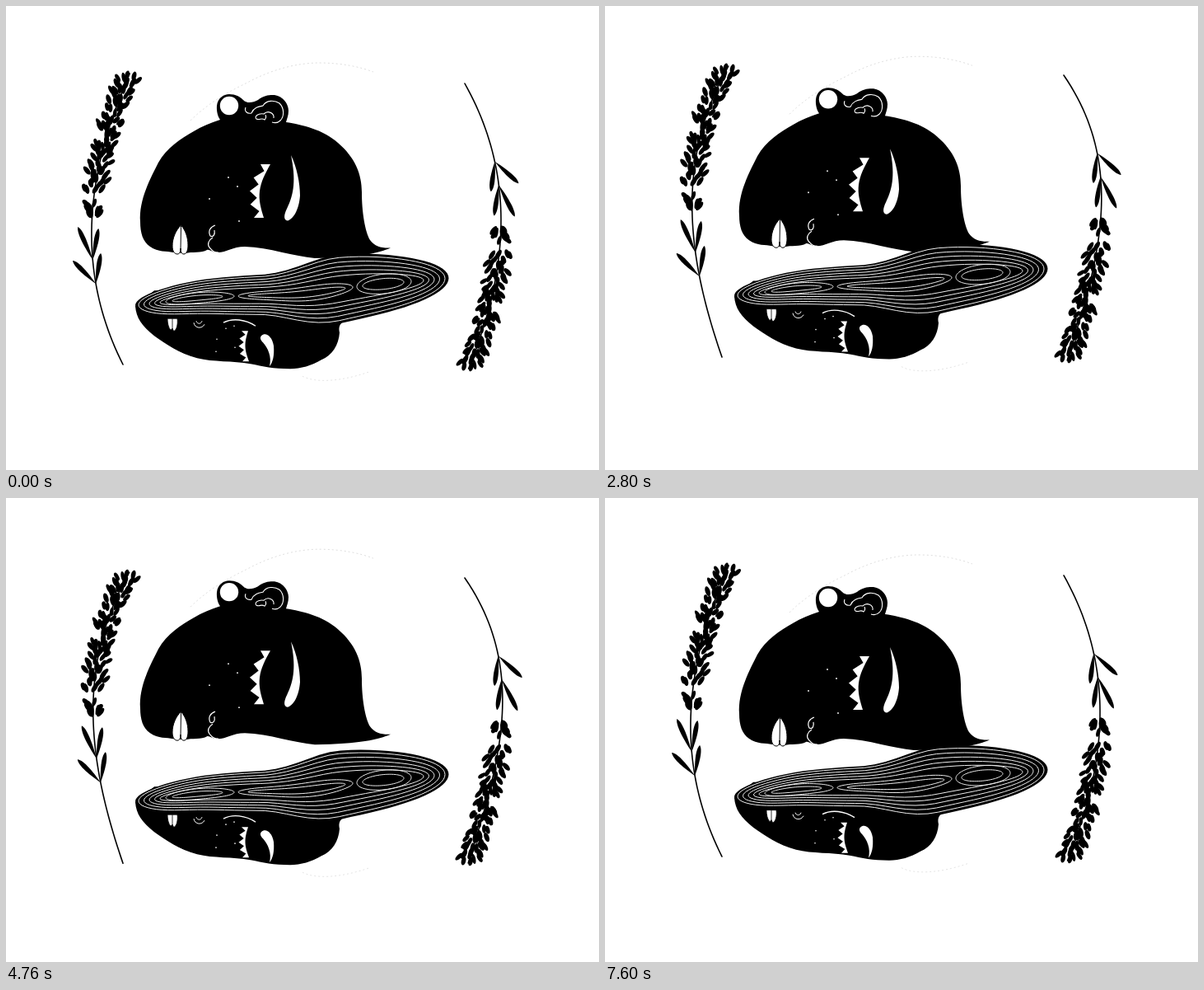
These frames come from a looping animation (720x563 px, 7640 ms). An HTML page with a canvas:

```html
<!DOCTYPE html>
<html lang="en">
<head>
<meta charset="utf-8">
<title>Lavender and wood</title>
<style>
html, body { margin: 0; width: 100%; height: 100%; overflow: hidden; background: #fff; }
canvas { display: block; }
</style>
</head>
<body>
<canvas id="stage" width="720" height="563"></canvas>
<script>
const ctx = document.getElementById('stage').getContext('2d');
const LOOP = 7640, STEP = 40, TAU = Math.PI * 2;
const INK = '#000', PAPER = '#fff';

const fill = (d, color) => { ctx.fillStyle = color; ctx.fill(d); };
const line = (d, color, width) => {
  ctx.strokeStyle = color;
  ctx.lineWidth = width;
  ctx.stroke(d);
};
const mix = (a, b, k) => a + (b - a) * k;
const bump = (u, at, wide) => Math.exp(-(((u - at) / wide) ** 2));
const smooth = (a, b, u) => {
  const k = Math.min(1, Math.max(0, (u - a) / (b - a)));
  return k * k * (3 - 2 * k);
};

let seed = 11;
const rnd = () => (seed = (seed * 16807) % 2147483647) / 2147483647;

// Path sampled from a function of 0..1
function trace(fn, n) {
  const p = new Path2D();
  for (let i = 0; i <= n; i++) p.lineTo(...fn(i / n));
  return p;
}

function disc(x, y, r, color) {
  ctx.beginPath();
  ctx.arc(x, y, r, 0, TAU);
  ctx.fillStyle = color;
  ctx.fill();
}

// Bowed strip whose left side is a row of teeth
function lashStrip(x0, x1, y, h, bow, reach) {
  const edge = t => mix(x0, x1, t) - bow * Math.sin(Math.PI * t);
  const p = trace(t => [edge(t), y + h * t], 16);
  for (let i = 8; i >= 0; i--)
    p.lineTo(edge(i / 8) - reach * (i % 2 ? 0.25 : 1), y + h * i / 8);
  return p;
}

function group(y, paint) {
  ctx.save();
  ctx.translate(0, y);
  paint();
  ctx.restore();
}

function dotted(d, color) {
  ctx.setLineDash([2, 3]);
  line(d, color, 0.7);
  ctx.setLineDash([]);
}

// ---- upper head ----
const head = new Path2D(`M163 262 C161 235 176 208 185 190 C195 172 212 161 228 152
  C238 146 248 142 260 138 C257 134 255.5 127 256 121 C257 112 264 107 271 107
  C279 107 284 110 288 114 C293 119 300 117 306 114 C312 109 318 108 324 108
  C335 108 343 118 343 127 C343 133 341 137 340 141 C360 144 385 150 403 166
  C424 184 432 204 432 226 C432 250 436 274 442 284 C448 292 456 294 467 293.5
  C452 300 430 305 375 306 C350 304 320 293 290 292 C275 292 268 299 257 299
  C250 299 247 295 244 296 C238 300 225 298 218 300 L203 299
  C195 297 185 299 175 292 C166 286 163 275 163 262Z`);
const teeth = new Path2D(`M212.5 266 C206 272 202 282 202 291 C202 298 205 301 208 301
  C211 301 212 298 212 294 C212 298 213 301 216 301 C219 301 221 297 221 290
  C221 281 218 272 212.5 266Z M212.5 267 L212 296`);
const lips = new Path2D(`M254 266 C248 268 245 273 248 279 C252 281 254 277 253 272
  M251 281 C246 284 244 289 247 293 C250 296 251 299 258 299`);
const lashes = lashStrip(321, 313, 192, 65, 9, 12);
const tear = new Path2D(`M346 181 C353 195 357 215 357 230 C356 245 350 258 342 260.5
  C336 260 338 252 341 246 C350 228 352 210 346 181Z`);
const ear = new Path2D(`M291 123 C289 128 293 131 298 130 C301 123 307 122 312 121
  C316 114 326 114 332 118 C338 124 338 134 333 139 C330 142 326 142 323 141
  M325 136 C326 130 318 126 313 131 C306 130 301 134 304 137 C308 139 310 135 314 138
  C316 136 316 134 315 132`);
const halo = new Path2D('M224 139 C245 118 270 104 293 93 C322 77 354 69 380 69 C408 69 430 74 446 80');
const freckles = [[270, 208], [281, 219], [247, 234], [283, 261]];

function drawHead() {
  dotted(halo, '#d0d0d0');
  fill(head, INK);
  disc(271, 121, 11.2, PAPER);
  line(ear, PAPER, 1.1);
  fill(lashes, PAPER);
  fill(tear, PAPER);
  for (const [x, y] of freckles) disc(x, y, 0.9, PAPER);
  fill(teeth, PAPER);
  line(teeth, INK, 1);
  line(lips, PAPER, 1.2);
}

// ---- lower face with the wood slab ----
const along01 = x => (x - 157) / 381;
const spine = u => 363 - 33 * u + 4 * bump(u, 0.53, 0.13) - 2.5 * bump(u, 0.2, 0.12);
const girth = u => 24 + 4 * bump(u, 0, 0.15) + 17 * smooth(0.4, 0.65, u);

// Closed loop of grain between two x, following the slab
function grain(x0, x1, thick) {
  return trace(t => {
    const a = t * TAU, x = mix(x0, x1, (1 + Math.cos(a)) / 2), u = along01(x);
    return [x, spine(u) + thick * girth(u) * Math.sin(a)];
  }, 90);
}

const slab = grain(157, 537.5, 1.07);
const rings = [];
for (let k = 0; k < 5; k++) rings.push(grain(161 + 6.5 * k, 533 - 6.5 * k, 0.98 - 0.14 * k));
for (let k = 0; k < 2; k++) {
  rings.push(grain(194 + 8 * k, 277 - 14 * k, 0.26 - 0.14 * k));
  rings.push(grain(282 + 12 * k, 421 - 9 * k, 0.25 - 0.13 * k));
  rings.push(grain(426 + 7 * k, 492 - 9 * k, 0.29 - 0.13 * k));
}
const face = new Path2D(`M157 364 C158 378 165 388 180 400 C194 410 210 421 232 427
  C252 432 275 430 297 434 C312 437 325 440 345 440 C358 440 371 436 383 429
  C396 424 404 411 405 396 C404 391 404 387 409 383 L400 345 L180 345Z`);
const lowTooth = new Path2D(`M196 379 L208 379 C209 386 207 394 203.5 394 L202 391
  L200 393 C197 390 196 384 196 379Z M202 379 L202 392`);
const nose = new Path2D('M228 384 C229 391 238 392 241 386 M231 382 C232 386 237 386 238 382');
const brow = new Path2D('M264 384 C275 378 291 380 303 388');
const lowLashes = lashStrip(294, 295, 394, 37, 4, 8);
const lowTear = new Path2D(`M310 400 C315 395 323 400 325 412 C326 424 324 432 320 437
  C323 425 318 415 312 408 C309 405 308 402 310 400Z`);
const lowHalo = new Path2D('M360 449 C375 457 405 456 440 444');
const lowFreckles = [[267, 391], [277, 388], [256, 404], [278, 414], [255, 419]];

function drawFace() {
  dotted(lowHalo, '#d8d8d8');
  fill(face, INK);
  fill(slab, INK);
  for (const r of rings) line(r, '#eee', 1);
  fill(lowTooth, PAPER);
  line(lowTooth, INK, 0.8);
  line(nose, PAPER, 1);
  line(brow, PAPER, 1.4);
  fill(lowLashes, PAPER);
  fill(lowTear, PAPER);
  for (const [x, y] of lowFreckles) disc(x, y, 0.8, PAPER);
}

// ---- lavender ----
const ROOT = 435, TALL = 357;
function stemX(y) {
  const v = (ROOT - y) / TALL;
  return 142 + v * (-180 + 230 * v - 40 * v * v);
}

// Sideways sway: the flower leans one way, the leaves the other
function bend(y, amount) {
  const u = 1 - (ROOT - y) / TALL;
  return amount * 130 * u * (1 - u) * (u - 0.45);
}

const leaves = [[337, -28, -28], [337, 6, -37], [308, -18, -40], [308, 7, -38]];
const buds = [];
for (let w = 0; w < 10; w++) {
  const y = w ? 231 - w * 15.8 : 247, reach = w ? 12.5 : 9;
  for (let i = 0; i < 11; i++) {
    const s = i / 5 - 1, by = y + (rnd() - 0.5) * 16;
    buds.push({
      x: stemX(by) + s * reach + (rnd() - 0.5) * 4,
      y: by,
      tilt: (w ? 0.2 : 0) + s * 0.7 + (rnd() - 0.5) * 0.5,
      long: 5 + rnd() * 1.4,
      wide: 2.3 + rnd() * 0.7
    });
  }
}

function drawLeaf(x, y, dx, dy) {
  const len = Math.hypot(dx, dy), nx = -dy / len * 5, ny = dx / len * 5;
  const at = (k, n) => [x + dx * k + nx * n, y + dy * k + ny * n];
  ctx.beginPath();
  ctx.moveTo(x, y);
  ctx.bezierCurveTo(...at(0.35, 0.5), ...at(0.85, 1), ...at(1, 0));
  ctx.bezierCurveTo(...at(0.85, -1), ...at(0.35, -0.5), x, y);
  ctx.fill();
}

function drawSprig(amount) {
  ctx.lineCap = 'round';
  line(trace(t => {
    const y = ROOT - t * (TALL - 4);
    return [stemX(y) + bend(y, amount), y];
  }, 50), INK, 1.6);
  ctx.fillStyle = INK;
  for (const [y, dx, dy] of leaves) drawLeaf(stemX(y) + bend(y, amount), y, dx, dy);
  for (const b of buds) {
    ctx.beginPath();
    ctx.ellipse(b.x + bend(b.y, amount), b.y, b.wide, b.long, b.tilt, 0, TAU);
    ctx.fill();
  }
}

// ---- motion ----
const times = [0, 1200, 2800, 4080, 5360, 6640, LOOP];
const leftBob = [0, -5, -9, 11, 3, -2, 0];
const rightBob = [0, -6, -10, 6, -2, -7, 0];

// Periodic Hermite curve through the keys
function along(keys, t) {
  const n = times.length - 1;
  const time = i => times[(i + n) % n] + Math.floor(i / n) * LOOP;
  const key = i => keys[(i + n) % n];
  const slope = i => (key(i + 1) - key(i - 1)) / (time(i + 1) - time(i - 1));
  let i = 0;
  while (i < n - 1 && t >= times[i + 1]) i++;
  const span = time(i + 1) - time(i), u = (t - time(i)) / span, v = 1 - u;
  return key(i) * (1 + 2 * u) * v * v + key(i + 1) * u * u * (3 - 2 * u)
    + span * (slope(i) * u * v * v - slope(i + 1) * u * u * v);
}

function draw(t) {
  const beat = t / LOOP * TAU * 2;
  const ramp = 1 - Math.abs(1 - 2 * t / LOOP);
  const sway = mix(ramp, (1 - Math.cos(beat / 2)) / 2, 0.5);
  ctx.fillStyle = PAPER;
  ctx.fillRect(0, 0, 720, 563);

  group(along(leftBob, t), () => drawSprig(sway));
  group(along(rightBob, t), () => {
    ctx.translate(557, 94);
    ctx.rotate(Math.PI - 0.037);
    ctx.scale(1, 0.98);
    ctx.translate(-142, -ROOT);
    drawSprig(-0.75 * sway);
  });
  group(-7 * (1 - Math.cos(beat)), drawHead);
  group(-3 + 8.7 * Math.sin(beat + 0.38), drawFace);
}

function tick() {
  const t = performance.now() % LOOP;
  draw(Math.floor(t / STEP) * STEP);
  requestAnimationFrame(tick);
}
tick();
</script>
</body>
</html>
```
